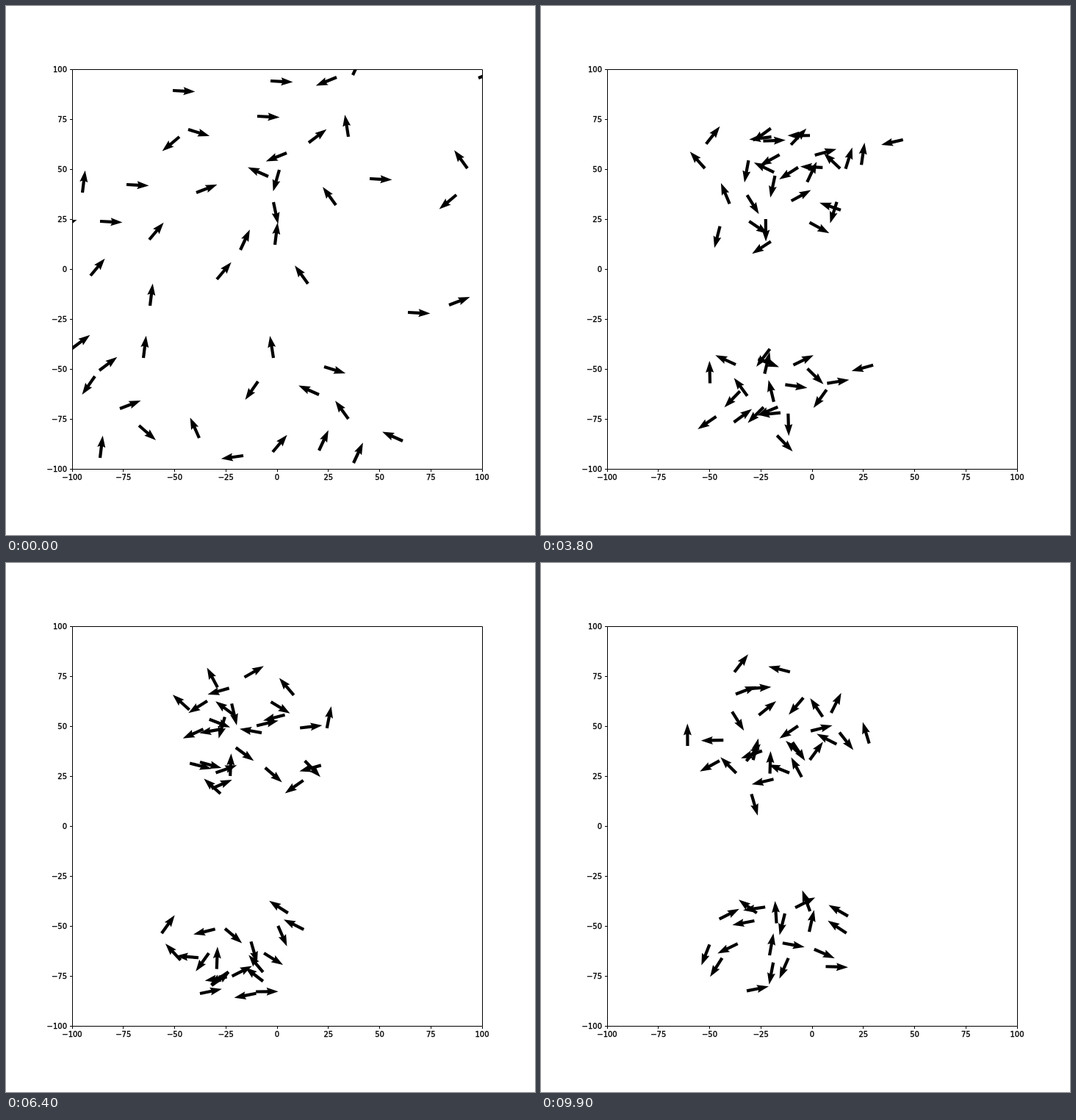
These frames come from a looping animation (720 by 720 pixels, 10000 ms). An HTML page:

```html
<!DOCTYPE html>
<html lang="en">
<head>
<meta charset="utf-8">
<title>Swarm</title>
<style>
  html, body { margin: 0; width: 100%; height: 100%; overflow: hidden; background: #fff; }
  svg { display: block; width: 720px; height: 720px; }
  text { font: 10px "DejaVu Sans", sans-serif; stroke: #000; stroke-width: .35px; }
  .axes { fill: none; stroke: #000; stroke-width: 1; }
</style>
</head>
<body>
<svg viewBox="0 0 720 720">
  <clipPath id="plot"><rect x="90" y="86.4" width="558" height="543.6"/></clipPath>
  <g id="swarm" clip-path="url(#plot)"></g>
  <path class="axes" d="M90.5 86.5H648.5V630.5H90.5Z"/>
  <path class="axes" id="ticks"/>
  <g id="labels"></g>
</svg>
<script>
const NS = 'http://www.w3.org/2000/svg';
const STEPS = 100, STEP_MS = 100;
const SPEED = 6, MAX_TURN = 0.3, SPACING = 30;
const CENTER_X = 318;
const ARROW = 'M0 -2.1H16L14.5 -5.5L30.5 0L14.5 5.5L16 2.1H0Z';

// Arrow tails (x, y pairs) that share a starting heading in degrees
const START = {
  '3': [227,115, 360,102, 342,150, 495,235, 128,293, 547,417, 164,243],
  '17': [248,168, 433,491],
  '41': [181,571],
  '78': [364,267],
  '106': [372,223],
  '125': [121,504, 343,511],
  '140': [236,178, 613,257],
  '158': [382,200, 450,97],
  '172': [323,612],
  '-156': [357,232, 426,529, 540,592],
  '-126': [411,378, 628,221, 449,271, 466,562],
  '-114': [263,588],
  '-99': [466,178, 364,479],
  '-83': [366,325, 104,254, 196,408, 187,479, 128,615],
  '-65': [319,332, 426,605, 473,622, 472,94],
  '-50': [195,318, 115,367, 363,607, 287,372],
  '-37': [412,186, 127,496, 90,466],
  '-21': [643,98, 259,254, 68,302, 603,407, 155,548]
};

const UPPER = { y: 233, ry: 62 };
const LOWER = { y: 528, ry: 45 };

function add(parent, tag, attrs) {
  const el = document.createElementNS(NS, tag);
  for (const key in attrs) el.setAttribute(key, attrs[key]);
  return document.getElementById(parent).appendChild(el);
}

function drawScale() {
  let d = '';
  for (let v = -100; v <= 100; v += 25) {
    const x = 369 + v * 2.79, y = 358.2 - v * 2.718;
    const px = Math.floor(x + 0.01) + 0.5, py = Math.floor(y + 0.01) + 0.5;
    const name = String(v).replace('-', '\u2212');
    d += `M${px} 630.5v3.5M90.5 ${py}h-3.5`;
    add('labels', 'text', { x, y: 645, 'text-anchor': 'middle' }).textContent = name;
    add('labels', 'text', { x: 83, y: y + 3.7, 'text-anchor': 'end' }).textContent = name;
  }
  document.getElementById('ticks').setAttribute('d', d);
}

function startPose() {
  const pose = [];
  for (const [deg, tails] of Object.entries(START)) {
    for (let i = 0; i < tails.length; i += 2) {
      const x = tails[i], y = tails[i + 1];
      const low = y > 405 || (x > 500 && y > 300);
      pose.push({ x, y, dir: deg * Math.PI / 180, home: low ? LOWER : UPPER });
    }
  }
  return pose;
}

// Wander inside a shrinking ellipse, keep apart, turn back at its edge
function advance(pose, step) {
  const rx = 95 + 110 * Math.exp(-step / 30);
  return pose.map((a, i) => {
    const wander = a.dir + 0.2 * Math.sin(i * 2.4 + step * 0.19);
    let vx = Math.cos(wander), vy = Math.sin(wander);

    const ox = a.x - CENTER_X, oy = a.y - a.home.y;
    const far = Math.hypot(ox, oy) || 1;
    const pull = 4 * Math.max(0, Math.hypot(ox / rx, oy / a.home.ry) - 0.85);
    vx -= pull * ox / far;
    vy -= pull * oy / far;

    for (const b of pose) {
      const dx = a.x - b.x, dy = a.y - b.y, gap = Math.hypot(dx, dy);
      if (b === a || gap >= SPACING || gap === 0) continue;
      const push = 0.7 * (1 - gap / SPACING) / gap;
      vx += dx * push;
      vy += dy * push;
    }

    const off = Math.atan2(vy, vx) - a.dir;
    const turn = Math.atan2(Math.sin(off), Math.cos(off));
    const dir = a.dir + Math.max(-MAX_TURN, Math.min(MAX_TURN, turn));
    return {
      x: a.x + SPEED * Math.cos(dir),
      y: a.y + SPEED * Math.sin(dir),
      dir, home: a.home
    };
  });
}

drawScale();
const poses = [startPose()];
for (let s = 1; s < STEPS; s++) poses.push(advance(poses[s - 1], s));
const arrows = poses[0].map(() => add('swarm', 'path', { d: ARROW }));

let shown = -1;
function render() {
  const step = Math.floor(performance.now() / STEP_MS) % STEPS;
  if (step !== shown) {
    poses[step].forEach(({ x, y, dir }, i) => {
      const deg = dir * 180 / Math.PI;
      arrows[i].setAttribute('transform', `translate(${x} ${y}) rotate(${deg})`);
    });
    shown = step;
  }
  requestAnimationFrame(render);
}
render();
</script>
</body>
</html>
```
